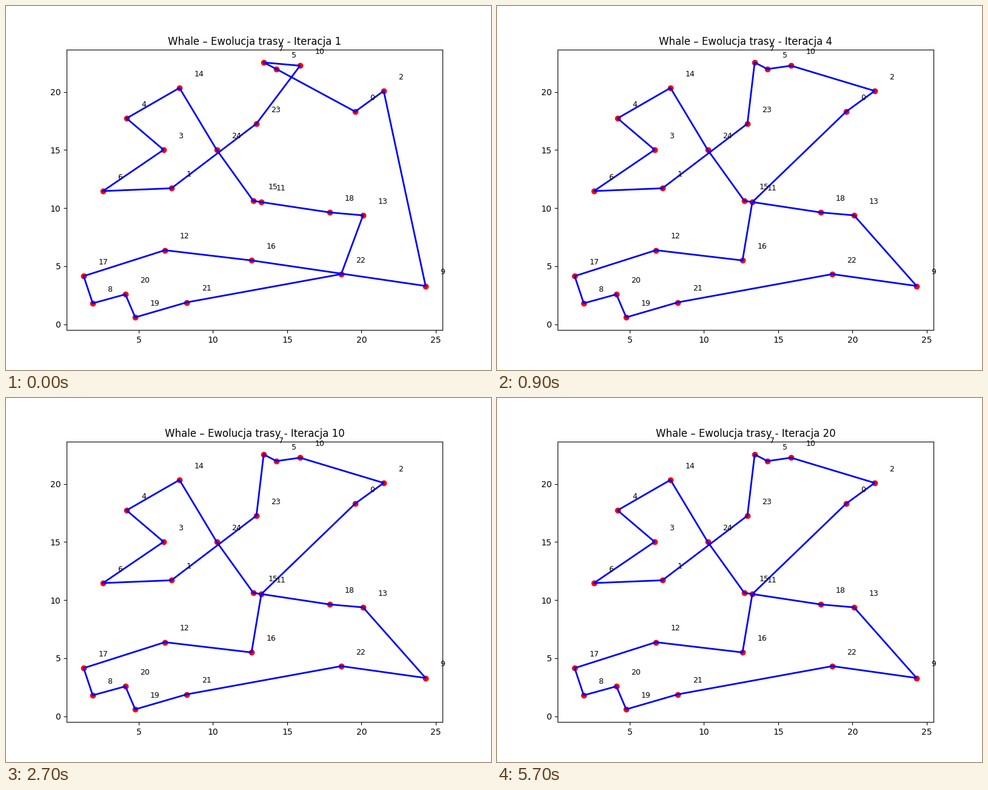
These frames come from a looping animation (800 by 600 pixels, 6000 ms). A matplotlib script:

```python
import matplotlib.pyplot as plt
from matplotlib.animation import FuncAnimation

FRAMES, INTERVAL = 20, 300

CITIES = [
    (19.57, 18.30), (7.20, 11.70), (21.49, 20.08), (6.67, 15.01), (4.18, 17.72),
    (14.27, 21.96), (2.59, 11.46), (13.41, 22.53), (1.90, 1.80), (24.31, 3.29),
    (15.86, 22.25), (13.25, 10.51), (6.76, 6.37), (20.10, 9.37), (7.74, 20.34),
    (12.71, 10.62), (12.59, 5.49), (1.29, 4.14), (17.86, 9.62), (4.76, 0.59),
    (4.10, 2.57), (8.23, 1.88), (18.63, 4.31), (12.92, 17.26), (10.25, 15.00),
]

# Parts shared by every route
LEFT = [23, 1, 6, 3, 4, 14, 24, 15]
BOTTOM = [12, 17, 8, 20, 19, 21]
TOP = [0, 2, 10, 5, 7]

ROUTES = {
    1: [0, 5, 7, 10] + LEFT + [11, 18, 13, 22] + BOTTOM[::-1] + [16, 9, 2],
    2: TOP + LEFT + [11, 18, 13, 16] + BOTTOM[::-1] + [22, 9],
    3: TOP + LEFT + [18, 13, 9, 22] + BOTTOM[::-1] + [16, 11],
}


def route_points(iteration):
    route = ROUTES[min(iteration, max(ROUTES))]
    return zip(*(CITIES[i] for i in route + route[:1]))


fig, ax = plt.subplots(figsize=(8, 6), dpi=100)
ax.set_xlim(0.143, 25.449)
ax.set_ylim(-0.496, 23.63)
ax.set_xticks(range(5, 26, 5))
ax.set_yticks(range(0, 21, 5))

ax.scatter(*zip(*CITIES), c="red")
for i, (x, y) in enumerate(CITIES):
    ax.text(x + 1, y + 1, str(i), fontsize=9)
path, = ax.plot([], [], "b-", linewidth=2)
title = ax.set_title("")


def update(frame):
    iteration = frame + 1
    path.set_data(*map(list, route_points(iteration)))
    title.set_text(f"Whale – Ewolucja trasy - Iteracja {iteration}")
    return path, title


anim = FuncAnimation(fig, update, frames=FRAMES, interval=INTERVAL,
                     repeat=True, repeat_delay=0, blit=False)
plt.show()
```
